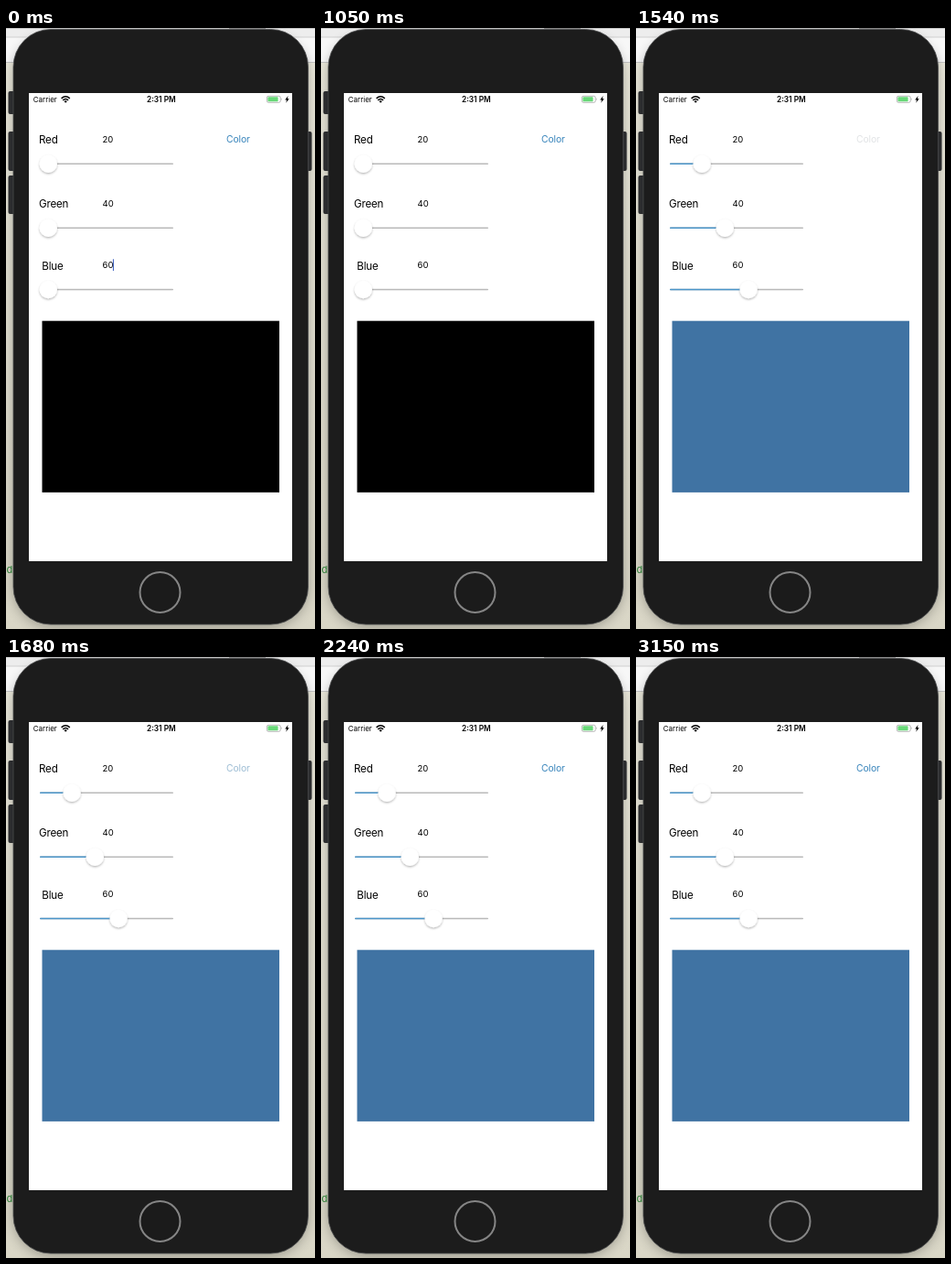
Write an HTML page that moves like this. It is 338 px wide and 656 px high and loops after 3.22 s.

```html
<!DOCTYPE html>
<html lang="en">
<head>
<meta charset="utf-8">
<title>Color sliders</title>
<style>
html, body { margin: 0; width: 100%; height: 100%; overflow: hidden; }
svg { display: block; width: 338px; height: 656px; }
text { font-family: Inter, "Open Sans", sans-serif; fill: #000; }
.label { font-size: 11.6px; letter-spacing: -.2px; }
.value { font-size: 9.5px; letter-spacing: -.1px; }
.status { font-size: 8px; }
.track { fill: #b9b9b9; }
.fill { fill: #4a95c9; }
.thumb { fill: #fff; filter: url(#thumbShadow); }

.caret, .button, .swatch, .fill, .knob { animation: 3220ms infinite step-end; }
.caret { animation-name: caret; }
.swatch { animation-name: swatch; }
.fill { animation-name: reveal; }
.knob { animation-name: slide; }
.button { font-size: 10.3px; letter-spacing: -.1px; fill: #3784bb; animation-name: press; }

/* caret hides at 490 ms, press at 1470, values apply at 1540 */
@keyframes caret { 0% { opacity: 1; } 15.217%, 100% { opacity: 0; } }
@keyframes swatch { 0% { fill: #000; } 47.826%, 100% { fill: #4073a3; } }
@keyframes reveal { 0% { opacity: 0; } 47.826%, 100% { opacity: 1; } }
@keyframes slide {
  0% { transform: translateX(0); }
  47.826%, 100% { transform: translateX(var(--shift)); }
}
@keyframes press {
  0% { fill: #3784bb; }
  45.652% { fill: #e1e3e5; }
  47.826% { fill: #e1e3e5; animation-timing-function: steps(5, end); }
  58.696%, 100% { fill: #3784bb; }
}
</style>
</head>
<body>
<svg viewBox="0 0 338 656">
  <defs>
    <linearGradient id="desk" x1="0" y1="0" x2="0" y2="1">
      <stop offset="0" stop-color="#eae8db"/>
      <stop offset="1" stop-color="#d9d6c6"/>
    </linearGradient>
    <filter id="phoneShadow" x="-20%" y="-20%" width="140%" height="140%">
      <feGaussianBlur stdDeviation="7"/>
    </filter>
    <filter id="thumbShadow" x="-30%" y="-30%" width="160%" height="170%">
      <feDropShadow dx="0" dy="1.3" stdDeviation="1" flood-color="#000" flood-opacity=".3"/>
    </filter>
  </defs>

  <!-- desktop -->
  <rect width="338" height="656" fill="url(#desk)"/>
  <rect width="338" height="38" fill="#f7f7f7"/>
  <rect width="338" height="10" fill="#ededed"/>
  <rect width="338" height="1" fill="#c9c9c9"/>
  <rect x="244" width="40" height="1" fill="#8e8e8e"/>
  <rect y="9.5" width="338" height="1" fill="#cfcfcf"/>
  <rect y="37" width="338" height="1" fill="#c4c4c4"/>
  <rect x="8" y="8" width="322" height="646" rx="44" fill="#000" opacity=".3" filter="url(#phoneShadow)"/>
  <text x="-6" y="595" font-size="11" style="fill:#2b7d35">nd</text>

  <!-- phone -->
  <g fill="#2b2c2e">
    <rect x="2.5" y="69" width="8" height="25" rx="2"/>
    <rect x="2.5" y="113" width="8" height="43" rx="2"/>
    <rect x="2.5" y="161" width="8" height="42" rx="2"/>
    <rect x="326" y="113" width="8.5" height="43" rx="2"/>
  </g>
  <rect x="8" y="1.5" width="322.5" height="649.5" rx="41" fill="#1c1c1c" stroke="#4b4c4d" stroke-width=".8"/>
  <circle cx="168.5" cy="616" r="22" fill="#1b1b1b" stroke="#858585" stroke-width="2"/>
  <rect x="25" y="71" width="288" height="511" fill="#fff"/>

  <!-- status bar -->
  <text class="status" x="29.7" y="81">Carrier</text>
  <g fill="none" stroke="#000" stroke-width="1.5">
    <path d="M60.6 76.9Q65.2 72.7 69.8 76.9"/>
    <path d="M62.3 78.9Q65.2 76.2 68.1 78.9"/>
  </g>
  <path d="M63.5 80Q65.2 78.6 66.9 80L65.2 81.8Z"/>
  <text class="status" x="154" y="81" style="font-weight:600;font-size:8.3px">2:31 PM</text>
  <rect x="285.4" y="74.3" width="14.8" height="7" rx="1.7" fill="#fff" stroke="#999" stroke-width=".7"/>
  <rect x="286.4" y="75.3" width="11.2" height="5" rx=".8" fill="#68d878"/>
  <path d="M301.2 76.6q1.2 1.2 0 2.4z" fill="#999"/>
  <path d="M308.6 74L305.2 78.4H307.1L306.2 81.8L309.7 77.2H307.8Z"/>

  <!-- controls -->
  <text class="label" x="36" y="126">Red</text>
  <text class="label" x="36" y="196">Green</text>
  <text class="label" x="39.3" y="263.5">Blue</text>
  <text class="value" x="105.6" y="124.8">20</text>
  <text class="value" x="105.6" y="194.8">40</text>
  <text class="value" x="105.6" y="262.3">60</text>
  <rect class="caret" x="116.9" y="252.3" width="1.1" height="12.7" fill="#4668c5"/>
  <text class="button" x="241" y="125.3">Color</text>

  <g id="sliders"></g>
  <rect class="swatch" x="39.5" y="319.7" width="259.5" height="187.2"/>
</svg>
<script>
const shape = (tag, cls, attrs) =>
  `<${tag} class="${cls}" ${Object.entries(attrs).map(([k, v]) => `${k}="${v}"`).join(' ')}/>`;

const slider = ([y, shift]) => {
  const line = { x: 37, y: y - .7, height: 1.4, rx: .7 };
  return shape('rect', 'track', { ...line, width: 146 })
    + shape('rect', 'fill', { ...line, width: 9 + shift })
    + `<g class="knob" style="--shift:${shift}px">`
    + shape('circle', 'thumb', { cx: 46.3, cy: y, r: 9.7 }) + '</g>';
};

document.getElementById('sliders').innerHTML =
  [[148.2, 25.8], [218.2, 51], [285.5, 76.8]].map(slider).join('');
</script>
</body>
</html>
```
